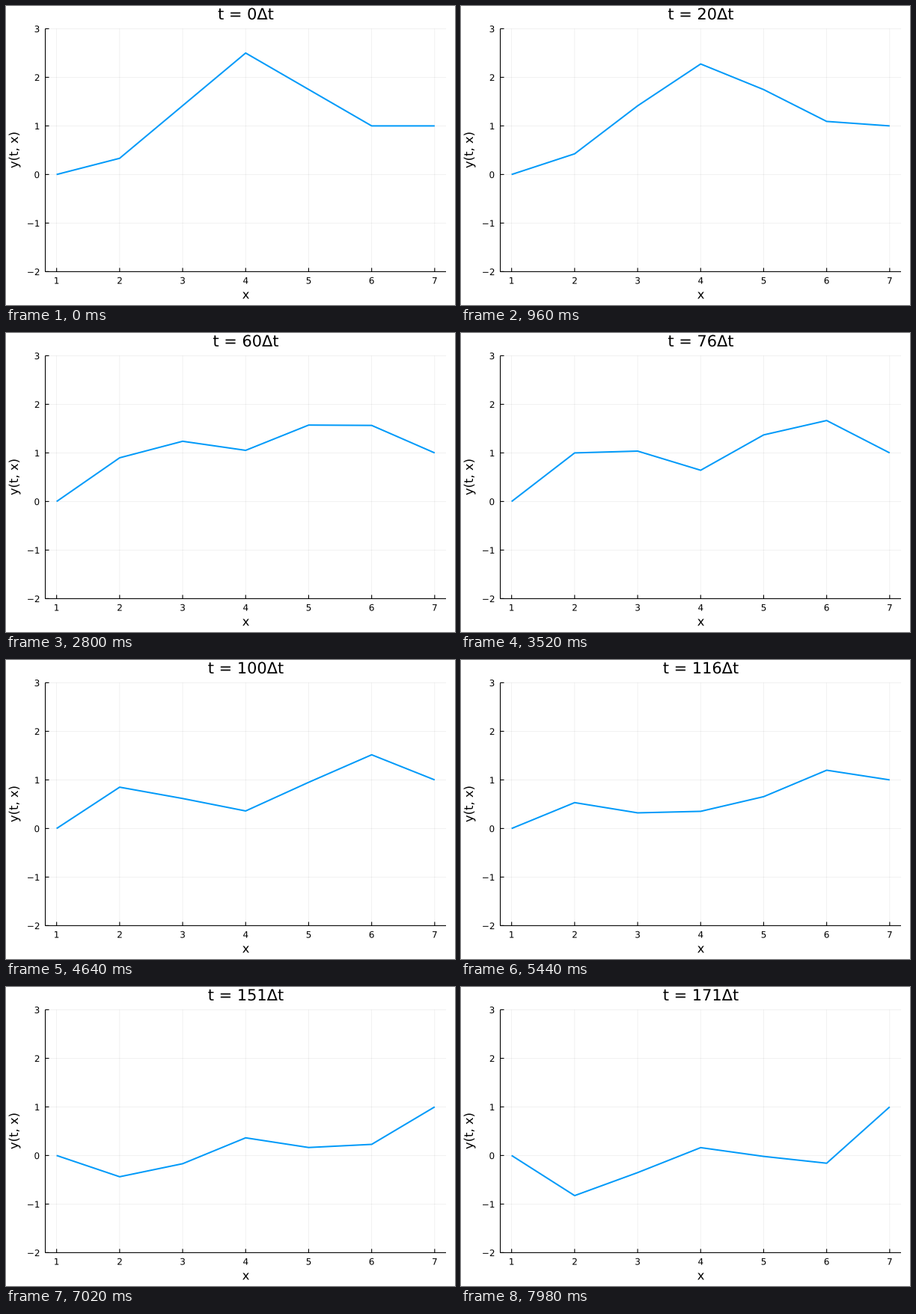
These frames come from a looping animation (600x400 px, 8 s). A matplotlib script:

```python
import numpy as np
import matplotlib.pyplot as plt
from matplotlib.animation import FuncAnimation
from matplotlib.patches import PathPatch
from matplotlib.textpath import TextPath
from matplotlib.transforms import Affine2D

plt.rcParams["font.family"] = "DejaVu Sans"

W, H, DPI = 600, 400, 100
TICK_MS, LOOP_MS = 20, 8000
LEFT, RIGHT, TOP, BOTTOM = 52.5, 588.0, 30.4, 355.4
DT = 0.02534

fig = plt.figure(figsize=(W / DPI, H / DPI), dpi=DPI, facecolor="white")
ax = fig.add_axes([0, 0, 1, 1])
ax.set_xlim(0, W)
ax.set_ylim(H, 0)
ax.axis("off")


def sx(x):
    return LEFT + (x - 0.82) * (RIGHT - LEFT) / 6.36


def sy(y):
    return BOTTOM - (y + 2) * (BOTTOM - TOP) / 5


def stroke(xs, ys, width=1.1, **style):
    style = {"color": "black", "solid_capstyle": "butt", **style}
    return ax.plot(xs, ys, lw=width * 72 / DPI, snap=False, **style)[0]


def grid(xs, ys):
    stroke(xs, ys, 0.7, alpha=0.08)


def outline(x, y, text, size, align=0.5, turn=0):
    """Glyph outlines with the baseline at (x, y), in stage pixels."""
    path = TextPath((0, 0), text, size=size)
    box = path.get_extents()
    place = Affine2D().translate(-box.x0 - align * box.width, 0)
    return place.scale(1, -1).rotate_deg(turn).translate(x, y).transform_path(path)


def label(*args, **kwargs):
    patch = PathPatch(outline(*args, **kwargs), fc="black", lw=0, snap=False)
    return ax.add_patch(patch)


def title_path(n):
    return outline(320.5, 18, f"t = {n}\u0394t", 20.9)


for x in range(1, 8):
    grid([sx(x)] * 2, [TOP, BOTTOM])
    stroke([sx(x)] * 2, [BOTTOM, BOTTOM - 5])
    label(sx(x), 371.6, str(x), 11.95)
for y in range(-2, 4):
    grid([LEFT, RIGHT], [sy(y)] * 2)
    stroke([LEFT, LEFT + 5], [sy(y)] * 2)
    label(44.3, sy(y) + 4.7, str(y).replace("-", "\u2212"), 11.95, align=1)
stroke([LEFT, LEFT], [TOP, BOTTOM])
stroke([LEFT, RIGHT], [BOTTOM, BOTTOM])

label(320.5, 391.5, "x", 16.4)
label(16, 193, "y(t, x)", 16.4, turn=-90)
title = label(320.5, 18, "t", 20.9)

# Seven-point string with fixed ends, solved by its normal modes
nodes = np.arange(7)
rest = nodes / 6
start = np.interp(nodes, [0, 1, 3, 5, 6], [0, 1 / 3, 2.5, 1, 1])
orders = np.arange(1, 6)
modes = np.sin(np.outer(orders, nodes) * np.pi / 6)
weights = modes @ (start - rest) / 3
omega = 2 * np.sin(orders * np.pi / 12)

curve = stroke(sx(nodes + 1), sy(start), 2, color="#009AF9",
               solid_joinstyle="round", zorder=5)


def step_at(ms):
    """Steps last 20, 100 and 20 ms in turn."""
    cycle, rest_ms = divmod(ms, 140)
    return 3 * cycle + (rest_ms >= 20) + (rest_ms >= 120)


def update(i):
    n = step_at(i * TICK_MS)
    y = rest + (weights * np.cos(omega * n * DT)) @ modes
    curve.set_ydata(sy(y))
    title.set_path(title_path(n))
    return curve, title


anim = FuncAnimation(fig, update, frames=LOOP_MS // TICK_MS, interval=TICK_MS,
                     repeat=True, repeat_delay=0, blit=False)
plt.show()
```
